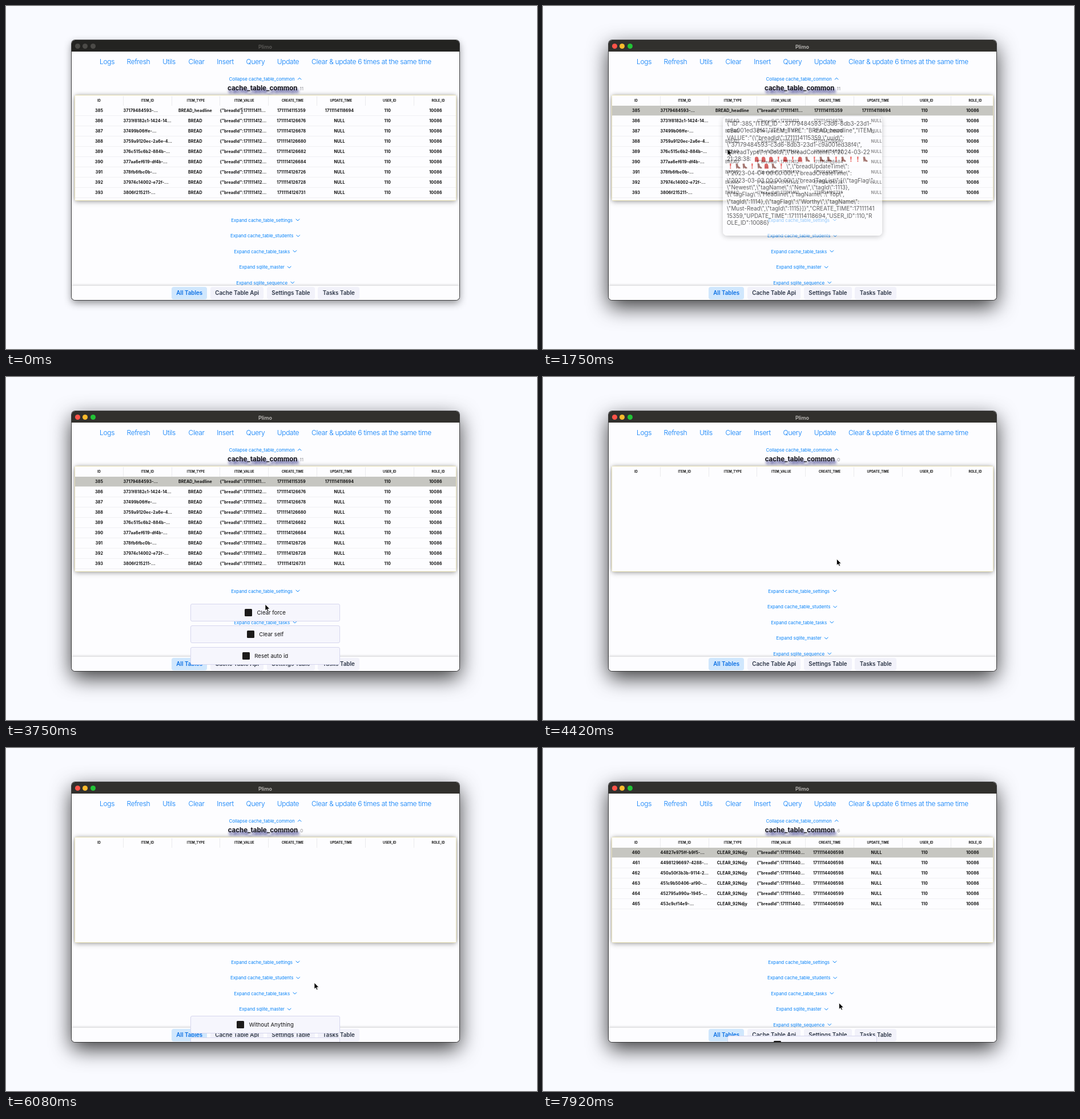
Animation of 930 by 602 pixels, one loop 8 s. Source, as an HTML page:

```html
<!DOCTYPE html>
<html lang="en">
<head>
<meta charset="utf-8">
<title>Table browser</title>
<style>
html, body { margin: 0; width: 100%; height: 100%; overflow: hidden; background: #f9faff; }
body { position: relative; font: 8px/1 Inter, "Open Sans", sans-serif; color: #111; white-space: nowrap; }
body * { box-sizing: border-box; }
.abs, .mid, .row span, .head span { position: absolute; }
.mid { transform: translate(-50%, -50%); }

#window {
  --a: 0;
  position: absolute; left: 115px; top: 60px; width: 679px; height: 456px;
  border-radius: 6px; overflow: hidden; background: #fdfdff;
  box-shadow: 0 0 0 1px rgba(30, 30, 30, .8),
    0 calc(5px + 7px * var(--a)) calc(14px + 22px * var(--a)) rgba(0, 0, 0, calc(.45 + .33 * var(--a)));
}
#page { position: absolute; left: -115px; top: -60px; width: 930px; height: 602px; }
#bar { left: 115px; top: 60px; width: 679px; height: 20px; background: #232321; color: #5c5b58; }
#bar b { left: 339px; top: 10.5px; font-size: 9px; font-weight: 600; }
#bar i { top: 6px; width: 9px; height: 9px; border-radius: 50%; background: #4b4a47; }
.active #bar { background: #31302d; color: #bdbbb8; }
.active #bar i { background: var(--c); }

.nav { top: 98px; font-size: 12px; font-weight: 300; letter-spacing: -.3px; color: #007af8; }
.link { left: 454.4px; display: flex; gap: 4.5px; align-items: center; letter-spacing: -.07px; color: #0a84f8; }
.link svg { width: 8px; height: 5px; fill: none; stroke: currentColor; }
.link.up svg { transform: scaleY(-1); }
#title { left: 454.5px; top: 145px; display: flex; gap: 4px; align-items: center; color: #8d8d92; }
#title b { font-size: 11.5px; color: #15151c; text-shadow: 2px 5px 4px rgba(25, 25, 120, .95); }

#table {
  left: 121px; top: 157px; width: 667px; height: 184px; overflow: hidden;
  background: #fdfdff;
}
#frame { left: 121px; top: 157px; width: 667px; height: 184px; border-radius: 2px;
  box-shadow: 0 0 0 .7px #ede2a6, 0 0 9px rgba(0, 0, 0, .36), 0 4px 10px rgba(0, 0, 0, .16); }
.head span { top: 1px; width: 84.8px; height: 17px; line-height: 17px; text-align: center;
  font-size: 5.6px; font-weight: 700; border-right: 1px solid #eaeaed; }
.head span:last-child { border: 0; }
.row { position: absolute; left: 0; width: 667px; height: 18px; border-bottom: 1px solid #f0f0f3;
  font-size: 7.1px; font-weight: 700; letter-spacing: .13px; line-height: 18px; }
.row.on { background: #c6c6c1; }
.row span { width: 84px; text-align: center; }
.row span.left { text-align: left; width: auto; }

#tabs { left: 115px; top: 491px; width: 679px; height: 25px; padding-top: 2px; display: flex; gap: 5.5px;
  justify-content: center; background: #fdfdff; box-shadow: 0 -1px 4px rgba(0, 0, 0, .2); }
#tabs span { height: 22px; padding: 0 8.3px; line-height: 22px; border-radius: 4px; background: #f2f2fa;
  font-size: 9.8px; font-weight: 600; color: #2b3445; }
#tabs span:first-child { background: #d0e7fd; color: #0a6fe4; }

#popup { left: 315px; top: 194px; width: 279px; height: 209px; margin: 0; padding: 6px 7px; border-radius: 7px;
  background: rgba(253, 253, 255, .82); box-shadow: 0 2px 10px rgba(0, 0, 0, .32); font: 9.9px/12.43px Inter, sans-serif; }
#popup svg { width: 12.7px; height: 10px; vertical-align: -1.5px; }

.menu { left: 323px; }
.menu div { width: 262px; height: 31px; margin-bottom: 7px; display: flex; gap: 8.5px; align-items: center;
  justify-content: center; background: #f6f6fd; border: 1px solid #d6d6ee; border-radius: 3px; font-size: 9.6px; }
.menu i { width: 13px; height: 13px; border-radius: 1.5px; background: #1c1b1a; }
#arrow, #beam { left: 0; top: 0; overflow: visible; }
</style>
</head>
<body>
<svg width="0" height="0" class="abs">
  <symbol id="G" viewBox="0 0 12.7 10"><path fill="#c9211f" d="M3 9.5V4Q3 .5 6 .5T9.5 4L10 9.5Z"/><path stroke="#8d1414" d="M3.5 7H9.5"/></symbol>
  <symbol id="B" viewBox="0 0 12.7 10"><path fill="#7d3a30" d="M2.5 .8L6 .5 7 5 10.5 7.5V9.2H7L5 7.5V9.2H3.5Z"/></symbol>
  <symbol id="X" viewBox="0 0 12.7 10"><path fill="#e3231d" d="M5 .5H7.7L7 6.5H5.7Z"/><circle cx="6.35" cy="8.4" r="1.1" fill="#e3231d"/></symbol>
</svg>

<div id="window"><div id="page">
  <div id="title" class="mid"><b>cache_table_common</b><span id="count"></span></div>
  <div id="frame" class="abs"></div>
  <div id="table" class="abs"><div class="head"></div><div id="rows"></div></div>
  <div id="tabs" class="abs"><span>All Tables</span><span>Cache Table Api</span><span>Settings Table</span><span>Tasks Table</span></div>
  <div id="bar" class="abs">
    <i class="abs" style="left:5.5px;--c:#ff5349"></i><i class="abs" style="left:19px;--c:#fdba2c"></i><i class="abs" style="left:32.5px;--c:#22c336"></i>
    <b class="mid">Plimo</b>
  </div>
<pre id="popup" class="abs">{"ID":385,"ITEM_ID":"37179484593-c3d6-8db3-23d1-
c9a001ed38f4","ITEM_TYPE":"BREAD_headline","ITEM_
VALUE":"{\"breadId\":1711114115359,\"uuid\":
\"37179484593-c3d6-8db3-23d1-c9a001ed38f4\",
\"breadType\":\"Cold\",\"breadContent\":\"2024-03-22
21:28:38: <span data-icons="GGGXGXGBXBBXBXXB"></span>
<span data-icons="XBBXBGBX"></span> \",\"breadUpdateTime\":
\"2023-04-04 00:00:00\",\"breadCreateTime\":
\"2023-03-03 00:00:00\",\"breadTagList\":[{\"tagFlag\":
\"Newest\",\"tagName\":\"New\",\"tagId\":1113},
{\"tagFlag\":\"Headline\",\"tagName\":\"Top\",
\"tagId\":1114},{\"tagFlag\":\"Worthy\",\"tagName\":
\"Must-Read\",\"tagId\":1115}]}","CREATE_TIME":17111141
15359,"UPDATE_TIME":1711114118694,"USER_ID":110,"R
OLE_ID":10086}</pre>
  <div id="clearMenu" class="menu abs" style="top:398px"></div>
  <div id="updateMenu" class="menu abs" style="top:360px"></div>
</div></div>

<svg id="beam" class="abs" width="8" height="12" fill="none" stroke="#444" stroke-width=".9"><path d="M-2 -5Q0 -5 0 -3.5V3.5Q0 5 -2 5M2 -5Q0 -5 0 -3.5M2 5Q0 5 0 3.5M-1.5 0H1.5"/></svg>
<svg id="arrow" class="abs" width="10" height="14"><path d="M0 0V11L2.5 8.7 4.2 12.5 6 11.7 4.4 8.1H7.8Z" stroke="#fff" stroke-width=".7"/></svg>

<script>
const $ = id => document.getElementById(id);
const page = $('page');
const LOOP = 8000, FPS = 12;

function add(parent, cls, html, style = '') {
  const el = document.createElement('div');
  el.className = cls;
  el.innerHTML = html;
  el.style.cssText = style;
  parent.prepend(el);
  return el;
}

// Static parts
const nav = {};
[['Logs', 177], ['Refresh', 232], ['Utils', 285.5], ['Clear', 333.5], ['Insert', 384], ['Query', 437],
 ['Update', 494], ['Clear &amp; update 6 times at the same time', 640]].forEach(([text, x]) => {
  nav[x] = add(page, 'mid nav', text, `left:${x}px`);
});

const chevron = '<svg viewBox="0 0 8 5"><path d="M.8 .7L4 4 7.2 .7"/></svg>';
const addLink = (text, y, cls = '') =>
  add(page, 'mid link ' + cls, `<span>${text}</span>${chevron}`, `top:${y}px`);
addLink('Collapse cache_table_common', 127.5, 'up');
['cache_table_settings', 'cache_table_students', 'cache_table_tasks', 'sqlite_master', 'sqlite_sequence']
  .forEach((name, i) => addLink('Expand ' + name, 375.5 + 27.5 * i));

document.querySelector('.head').innerHTML =
  ['ID', 'ITEM_ID', 'ITEM_TYPE', 'ITEM_VALUE', 'CREATE_TIME', 'UPDATE_TIME', 'USER_ID', 'ROLE_ID']
    .map((name, i) => `<span style="left:${84.8 * i}px">${name}</span>`).join('');

document.querySelectorAll('[data-icons]').forEach(el => {
  el.innerHTML = [...el.dataset.icons].map(id => `<svg><use href="#${id}"/></svg>`).join('');
});

const fillMenu = (id, names) => {
  $(id).innerHTML = names.map(name => `<div><i></i><span>${name}</span></div>`).join('');
};
fillMenu('clearMenu', ['Clear force', 'Clear self', 'Reset auto id']);
fillMenu('updateMenu', ['Without Anything', 'With LOCK', 'With BATCH', 'With TRANSACTION']);

// Table contents
function batch(firstId, type, value, ids, times) {
  return ids.split(' ').map((itemId, i) =>
    [firstId + i, itemId + '...', type, `{"breadId":${value}...`, times(i), 'NULL', 110, 10086]);
}
const bread = batch(385, 'BREAD', '171111412',
  '37179484593- 3731f8182c1-1424-14 37499b06ffe- 3759a9120ec-2a6e-4 376c515c6b2-884b- 377aa6ef619-df4b- 378fb6fbc0b- 37974c14002-e72f- 3806f215211-',
  i => '17111141266' + (76 + 2 * (i - 1)));
bread[0].splice(2, 4, 'BREAD_headline', '{"breadId":171111411...', '1711114115359', '1711114118694');
['726', '728', '731'].forEach((end, i) => bread[6 + i][4] = '1711114126' + end);
const lockRows = batch(430, 'CLEAR_DH9fsS', '171111440',
  '418c6a59261- 419b72e81c2-99e4- 4200dbef0f0-83d6-5 42115924ce5- 422c4c656a0-6411-8 4234803cb0d-372c-',
  i => '17111144048' + (89 + i));
const batchRows = batch(460, 'CLEAR_92Ndjy', '171111440',
  '44827e975ff-b9f5- 44981296697-4288- 450a50f3b3b-9114-2 451c9b50406-af90- 452795a990a-1945- 453c9cf14e9-',
  i => '171111440659' + (i < 4 ? 8 : 9));
const emptyRows = [];

let shown;
function showRows(rows, count) {
  if (rows === shown) return;
  shown = rows;
  $('count').textContent = count;
  $('rows').innerHTML = rows.map((cells, r) =>
    `<div class="row" style="top:${18 + 18 * r}px">` + cells.map((cell, c) =>
      c === 1 || c === 3
        ? `<span class="left" style="left:${84.5 * c}px">${cell}</span>`
        : `<span style="left:${84.2 * c}px">${cell}</span>`).join('') + '</div>').join('');
}

// Timing: [time, value, ...] keys with linear motion between them
function track(keys, t) {
  const i = keys.findIndex(key => key[0] > t);
  if (i === 0) return keys[0].slice(1);
  if (i < 0) return keys[keys.length - 1].slice(1);
  const a = keys[i - 1], b = keys[i], p = (t - a[0]) / (b[0] - a[0]);
  return a.slice(1).map((v, j) => v + (b[j + 1] - v) * p);
}
const pointer = [
  [0, 414, 185], [920, 414, 185], [1500, 288, 275], [1670, 288, 275], [2000, 433, 176], [2330, 439, 106],
  [2420, 439, 106], [2670, 383, 100], [2750, 383, 100], [2830, 312, 98], [3250, 312, 98], [3500, 384, 340],
  [3580, 384, 340], [3750, 454, 399], [3830, 454, 399], [4000, 479, 410], [4250, 479, 410], [4830, 600, 101],
  [5080, 600, 101], [5330, 581, 238], [5830, 540, 412], [6080, 540, 412], [6420, 611, 121], [6500, 611, 121],
  [6670, 611, 104], [6830, 611, 104], [6920, 603, 221], [7080, 551, 382], [7170, 551, 382], [7500, 524, 456],
  [7670, 524, 456], [7750, 518.5, 447.5]];
const popupFade = [[500, 0], [670, .95], [750, 1], [1670, 1], [1920, 0]];
const clearSlide = [[3170, 118], [3330, 30], [3500, 0], [4160, 0], [4170, 160]];
const updateSlide = [[5170, 160], [5330, 29], [5500, 0], [6000, 0], [6080, 110], [6170, 160],
  [7000, 160], [7080, 0], [7910, 0], [7920, 145]];

const within = (t, from, to) => t >= from && t < to;

function render(t) {
  const win = $('window');
  win.classList.toggle('active', t >= 170);
  win.style.setProperty('--a', t < 170 ? 0 : t < 250 ? .5 : 1);

  if (t < 4170) showRows(bread, 11);
  else if (t < 6170) showRows(emptyRows, 0);
  else if (t < 7920) showRows(lockRows, 6);
  else showRows(batchRows, 6);
  $('rows').firstChild?.classList.toggle('on', t >= 250);

  $('popup').style.opacity = track(popupFade, t);
  $('clearMenu').style.transform = `translateY(${track(clearSlide, t)}px)`;
  $('updateMenu').style.transform = `translateY(${track(updateSlide, t)}px)`;
  nav[333.5].style.opacity = within(t, 3170, 3330) ? .5 : 1;
  nav[640].style.opacity = within(t, 5080, 5250) || within(t, 6920, 7080) ? .5 : 1;

  const [x, y] = track(pointer, t);
  $('arrow').style.transform = `translate(${x}px, ${y}px)`;
  $('arrow').style.visibility = t < 170 ? 'hidden' : 'visible';
  $('beam').style.transform = 'translate(413px, 184px)';
  $('beam').style.visibility = t < 170 ? 'visible' : 'hidden';
}

// The picture advances 12 times a second, on 10 ms ticks
const start = performance.now();
function tick() {
  const elapsed = (performance.now() - start) % LOOP;
  const step = Math.floor((elapsed + 5) * FPS / 1000) % (LOOP * FPS / 1000);
  render(Math.round(step * 100 / FPS) * 10);
  requestAnimationFrame(tick);
}
tick();
</script>
</body>
</html>
```
